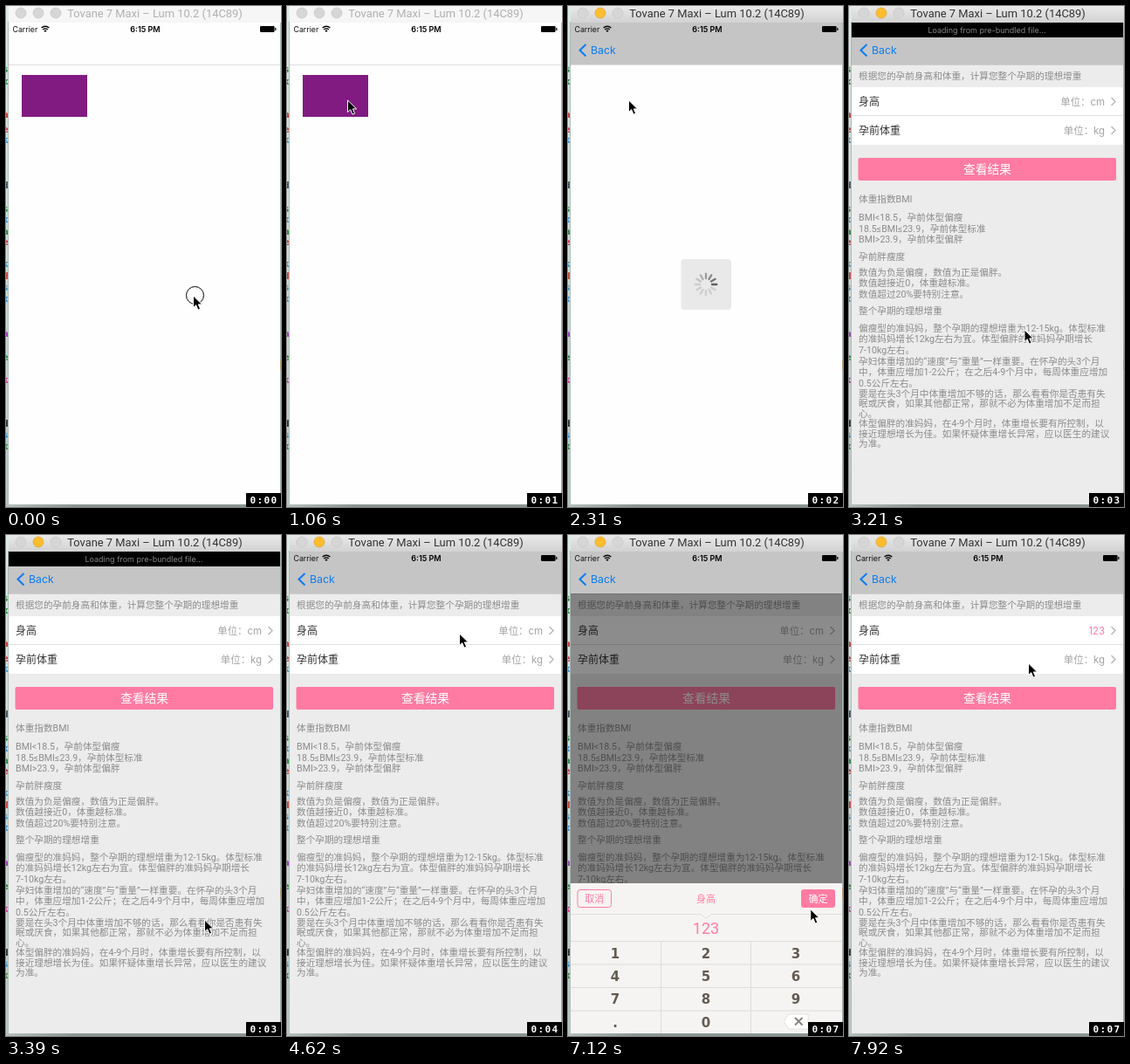
These frames come from a looping animation (315 px wide and 574 px high, 8 s). An HTML page:

```html
<!DOCTYPE html>
<html lang="zh-CN">
<head>
<meta charset="utf-8">
<style>
html, body { margin: 0; width: 100%; height: 100%; overflow: hidden; background: #c9d6d2; }
svg { display: block; width: 100vw; height: 100vh; }
text { font-family: Roboto, 'Noto Sans CJK SC', 'Noto Sans CJK', sans-serif; white-space: pre; }
.ui { font-family: Inter, 'Noto Sans CJK SC', 'Noto Sans CJK', sans-serif; }
.key { font-family: 'DejaVu Sans', sans-serif; font-weight: bold; }
.mono { font-family: 'DejaVu Sans Mono', monospace; font-weight: bold; }
</style>
</head>
<body>
<svg id="stage" viewBox="0 0 315 574"></svg>
<script>
const PINK = '#ff7ba3', TICKS = 90, LOOP = 8000, TICK = LOOP / TICKS;

const rect = (x, y, w, h, fill, more = '') =>
  `<rect x="${x}" y="${y}" width="${w}" height="${h}" fill="${fill}" ${more}/>`;
const text = (x, y, size, fill, str, more = '') =>
  `<text x="${x}" y="${y}" font-size="${size}" fill="${fill}" ${more}>${str.replace(/</g, '&lt;')}</text>`;
const path = (d, stroke, width, more = '') =>
  `<path d="${d}" fill="none" stroke="${stroke}" stroke-width="${width}" ${more}/>`;
const group = (id, body, more = '') => `<g id="${id}" ${more}>${body}</g>`;
const MID = 'text-anchor="middle"', END = 'text-anchor="end"';

// Editor window peeking out behind the simulator
function backdrop() {
  const bits = [[76, 'g'], [90, 'g'], [128, 'r'], [145, 'r'], [157, 'b'], [209, 'n'], [236, 'g'],
    [248, 'b'], [262, 'g'], [274, 'r'], [299, 'b'], [313, 'r'], [326, 'b'], [339, 'b'],
    [379, 'p'], [406, 'g'], [432, 'm'], [482, 'k'], [495, 'b'], [508, 'g']];
  const ink = { g: '#1c8a2c', r: '#c8322d', b: '#2a8fd0', n: '#345', p: '#93b', m: '#d02a9c', k: '#222' };
  return rect(0, 0, 315, 574, 'url(#desk)') +
    bits.map(([y, c], i) => text(-4, y, 11, ink[c], 'sxaekd'[i % 6], 'class="mono"')).join('') +
    rect(314, 405, 1, 12, '#e09a3c') + rect(0, 571, 315, 3, 'url(#shade)') + rect(2, 18, 1, 553, '#a9b8b4');
}

function titleBar() {
  return rect(3, 0, 312, 19, '#f6f6f6', 'id="bar"') +
    [17, 37, 57].map((x, i) =>
      `<circle id="light${i}" cx="${x}" cy="8" r="6" fill="#d6d6d6" stroke="#c6c6c6" stroke-width=".7"/>`).join('') +
    text(170.5, 13, 12.9, '#b0b0b0', 'Tovane 7 Maxi – Lum 10.2 (14C89)', `id="title" ${MID}`);
}

function statusBar() {
  const wifi = path('M40.6 25.1Q45 21.3 49.4 25.1M42.2 27Q45 24.7 47.8 27', '#000', 1.3) +
    '<path d="M43.4 28.2Q45 27 46.6 28.2L45 30Z"/>';
  return group('status',
    text(7.5, 30, 8.8, '#111', 'Carrier', 'class="ui"') + wifi +
    text(159.5, 30, 9, '#000', '6:15 PM', `class="ui" font-weight="600" ${MID}`) +
    rect(291, 23, 16.5, 7, '#000', 'rx="1.2"') + rect(308.2, 25, 1.2, 3, '#000')) +
    group('loading', rect(3, 19, 311, 17, '#000') +
      text(158, 30.5, 9, '#858585', 'Loading from pre-bundled file...', `class="ui" ${MID}`));
}

function navBar() {
  return rect(3, 19, 311, 48, '#fefefe') + rect(3, 19, 311, 48, '#000', 'id="navDim"') +
    rect(0, 19, 700, 48, 'url(#haze)', 'id="navGray"') +
    rect(3, 67, 311, 1, '#000', 'opacity=".12"') +
    path('M20.5 44L13.5 50.7L20.5 57.5', '#0a7cf6', 2, 'id="chevron"') +
    text(26, 55, 12.3, '#0a7cf6', 'Back', 'id="back" class="ui"');
}

function spinner() {
  let petals = '';
  for (let i = 0; i < 12; i++)
    petals += `<line class="petal" y1="-7" y2="-12.3" stroke-width="2.3" stroke-linecap="round" transform="translate(158 319) rotate(${i * 30})"/>`;
  return rect(129.5, 290, 57.5, 58, '#e9e9e9', 'rx="4"') + petals;
}

const LINES = [
  [80, '根据您的孕前身高和体重，计算您整个孕期的理想增重'],
  [221, '体重指数BMI'],
  [241.5, 'BMI<18.5，孕前体型偏瘦'], [254.5, '18.5≤BMI≤23.9，孕前体型标准'], [267, 'BMI>23.9，孕前体型偏胖'],
  [286.5, '孕前胖瘦度'],
  [305, '数值为负是偏瘦，数值为正是偏胖。'], [317, '数值越接近0，体重越标准。'], [329.5, '数值超过20%要特别注意。'],
  [349, '整个孕期的理想增重'],
  [368.5, '偏瘦型的准妈妈，整个孕期的理想增重为12-15kg。体型标准'],
  [381, '的准妈妈增长12kg左右为宜。体型偏胖的准妈妈孕期增长'], [394, '7-10kg左右。'],
  [406.5, '孕妇体重增加的“速度”与“重量”一样重要。在怀孕的头3个月'],
  [419, '中，体重应增加1-2公斤；在之后4-9个月中，每周体重应增加'], [431.5, '0.5公斤左右。'],
  [443.5, '要是在头3个月中体重增加不够的话，那么看看你是否患有失'],
  [455, '眠或厌食，如果其他都正常，那就不必为体重增加不足而担'], [466.5, '心。'],
  [478, '体型偏胖的准妈妈，在4-9个月时，体重增长要有所控制，以'],
  [490, '接近理想增长为佳。如果怀疑体重增长异常，应以医生的建议'], [501, '为准。']];

function page() {
  const cell = (y, label, unit, id) =>
    text(11, y + 4.5, 12, '#333', label) +
    text(293, y + 4, 11.4, '#a3a3a3', unit, `id="${id}" class="ui" ${END}`) +
    path(`M300.5 ${y - 4.5}L305 ${y}L300.5 ${y + 4.5}`, '#b5b5b5', 1.3);
  return rect(3, 67, 311, 504, '#ececec') + rect(3, 93, 311, 66, '#fff') +
    rect(3, 125, 311, 1, '#e0e0e0') +
    cell(109.5, '身高', '单位：cm', 'height') + cell(142.5, '孕前体重', '单位：kg', 'weight') +
    rect(10.5, 174, 295.5, 26, PINK, 'rx="2"') + text(158.5, 192, 13.7, '#fff', '查看结果', MID) +
    LINES.map(([y, s]) => text(11, y + 4, 10.65, '#8b8b8b', s)).join('');
}

function keypad() {
  const keys = ['1', '2', '3', '4', '5', '6', '7', '8', '9', '.', '0'];
  const digits = keys.map((k, i) =>
    text([54, 158, 261][i % 3], 484.5 + 26.4 * (i / 3 | 0), 15, '#635b52', k, `class="key" ${MID}`)).join('');
  const rows = [465, 491.5, 518, 544.5].map(y => rect(3, y, 311, 1, '#dfdcd9')).join('');
  return rect(3, 67, 311, 332, '#000', 'opacity=".45"') + rect(3, 399, 311, 172, '#f6f4f2') +
    path('M3 434.5H152L158 439.5L164 434.5H314', '#dfdcd9', 1) + rows +
    rect(106, 465, 1, 106, '#dfdcd9') + rect(209, 465, 1, 106, '#dfdcd9') +
    rect(11, 406.5, 38.5, 20, 'none', `rx="3" stroke="${PINK}"`) + text(30.3, 420.7, 11, PINK, '取消', MID) +
    rect(267, 406, 39, 21, PINK, 'rx="3"') + text(286.5, 420.7, 11, '#fff', '确定', MID) +
    text(158, 420.7, 11, PINK, '身高', MID) +
    text(158, 457, 18, PINK, '0', `id="entry" ${MID}`) + digits +
    '<path d="M247 557.5L253 549H275V566H253Z" fill="#fff" stroke="#dedad6" stroke-width=".8"/>' +
    path('M260 553L268.5 561.5M268.5 553L260 561.5', '#857f79', 1.8);
}

const stage = document.getElementById('stage');
stage.innerHTML = `<defs>
  <linearGradient id="desk" x2="0" y2="1"><stop stop-color="#dcebe4"/><stop offset=".5" stop-color="#cfded8"/><stop offset="1" stop-color="#b9c8c4"/></linearGradient>
  <linearGradient id="shade"><stop stop-color="#b4c0bc"/><stop offset=".25" stop-color="#8b9592"/></linearGradient>
  <linearGradient id="active" x2="0" y2="1"><stop stop-color="#e9e9e9"/><stop offset="1" stop-color="#d2d2d2"/></linearGradient>
  <linearGradient id="haze" gradientUnits="userSpaceOnUse" x1="0" x2="45"><stop stop-color="#c5c5c5" stop-opacity=".25"/><stop offset="1" stop-color="#c5c5c5"/></linearGradient>
  <linearGradient id="edge"><stop stop-color="#000" stop-opacity="0"/><stop offset="1" stop-color="#000" stop-opacity=".12"/></linearGradient>
  <clipPath id="screen"><rect x="3" y="19" width="311" height="552"/></clipPath></defs>` +
  backdrop() + titleBar() +
  `<g clip-path="url(#screen)">` +
    rect(3, 19, 311, 552, '#fefefe') +
    group('first', rect(18, 79, 75, 48, '#811b81')) + rect(3, 67, 311, 504, '#000', 'id="dim"') +
    group('second', rect(-2, 67, 5, 504, 'url(#edge)') + rect(3, 67, 311, 504, '#fefefe') + spinner()) +
    group('page', page()) + navBar() + statusBar() + group('keypad', keypad()) +
  '</g>' +
  rect(314, 19, .6, 552, '#8d9895') +
  group('cursor', '<circle id="ring" cx="2.5" cy=".5" r="10" fill="none" stroke="#000"/>' +
    '<path d="M.5 1V14.6L3.7 11.7L6 17.2L8.6 16.1L6.3 10.9H10.6Z" stroke="#fff" stroke-width="1"/>') +
  rect(275, 558, 40, 16, '#000') + text(279.5, 570, 11, '#fff', '', 'id="clock" class="mono" letter-spacing="1.4"');

const el = {};
stage.querySelectorAll('[id]').forEach(e => el[e.id] = e);
const petals = stage.querySelectorAll('.petal');
const set = (id, attrs) => { for (const k in attrs) el[id].setAttribute(k, attrs[k]); };
const show = (id, on) => set(id, { visibility: on ? 'visible' : 'hidden' });
const move = (id, x, y = 0) => set(id, { transform: `translate(${x} ${y})` });

// Pointer stops: tick, x, y
const STOPS = [[3, 214, 331], [12, 69, 107], [26, 69, 107], [27, 69, 109], [33, 174, 300], [34, 174, 300],
  [38, 227, 440], [41, 227, 440], [50, 197, 112], [56, 197, 112], [65, 155, 475], [66, 95, 474], [67, 62, 472],
  [69, 62, 472], [71, 155, 473], [72, 155, 473], [74, 258, 473], [76, 258, 473], [82, 284, 412],
  [83, 284, 412], [84, 286, 398], [86, 202, 130], [87, 202, 130], [89, 205, 146]];
const CLICKS = [0, 18, 50, 51, 68, 72, 75, 82];

function pointer(n) {
  const i = STOPS.findIndex(s => s[0] >= n);
  if (i < 1) return STOPS[0].slice(1);
  const [a, ax, ay] = STOPS[i - 1], [b, bx, by] = STOPS[i];
  const u = (n - a) / (b - a), e = u * u * (3 - 2 * u);
  return [ax + (bx - ax) * e, ay + (by - ay) * e];
}

// Critically damped spring for the screen push
function pushAt(n) {
  if (n <= 18) return 0;
  if (n >= 26) return 1;
  const u = .915 * (n - 18);
  return 1 - (1 + u) * Math.exp(-u);
}

function draw(t) {
  const n = Math.min(TICKS - 1, Math.floor((t + 12) / TICK));
  const p = pushAt(n), rest = 1 - p, active = n >= 18;

  set('bar', { fill: active ? 'url(#active)' : '#f6f6f6' });
  set('title', { fill: active ? '#333' : '#b0b0b0' });
  set('light1', { fill: active ? '#fdbd2f' : '#d6d6d6', stroke: active ? '#e0a130' : '#c6c6c6' });

  move('first', -93 * p);
  set('dim', { opacity: .1 * p });
  set('navDim', { opacity: .1 * p });
  move('second', 311 * rest);
  show('second', p > 0);
  move('navGray', p < 1 ? 3 + 544 * rest : -60);
  show('navGray', p > 0);
  move('back', 115 * rest);
  set('back', { opacity: p < 1 ? Math.max(0, p * 1.2 - .15) : 1 });
  set('chevron', { opacity: Math.max(0, (p - .6) / .4) });

  const head = Math.floor(n * 1.067) % 12;
  petals.forEach((e, i) => {
    const age = (head - i + 12) % 12, g = Math.round(Math.min(205, 95 + age * 20));
    e.setAttribute('stroke', `rgb(${g},${g},${g})`);
  });

  const loading = n >= 35 && n < 43;
  show('loading', loading);
  show('status', !loading);
  show('page', n >= 36);
  show('keypad', n >= 53 && n < 83);
  const typed = n < 68 ? '0' : n < 72 ? '1' : n < 75 ? '12' : '123';
  el.entry.textContent = typed;
  const saved = n >= 83;
  el.height.textContent = saved ? typed : '单位：cm';
  set('height', { fill: saved ? PINK : '#a3a3a3' });

  move('cursor', ...pointer(n));
  show('ring', CLICKS.includes(n));
  el.clock.textContent = '0:0' + Math.floor((n * TICK + 1) / 1000);
}

function loop(now) {
  draw(now % LOOP);
  requestAnimationFrame(loop);
}
draw(0);
requestAnimationFrame(loop);
</script>
</body>
</html>
```
